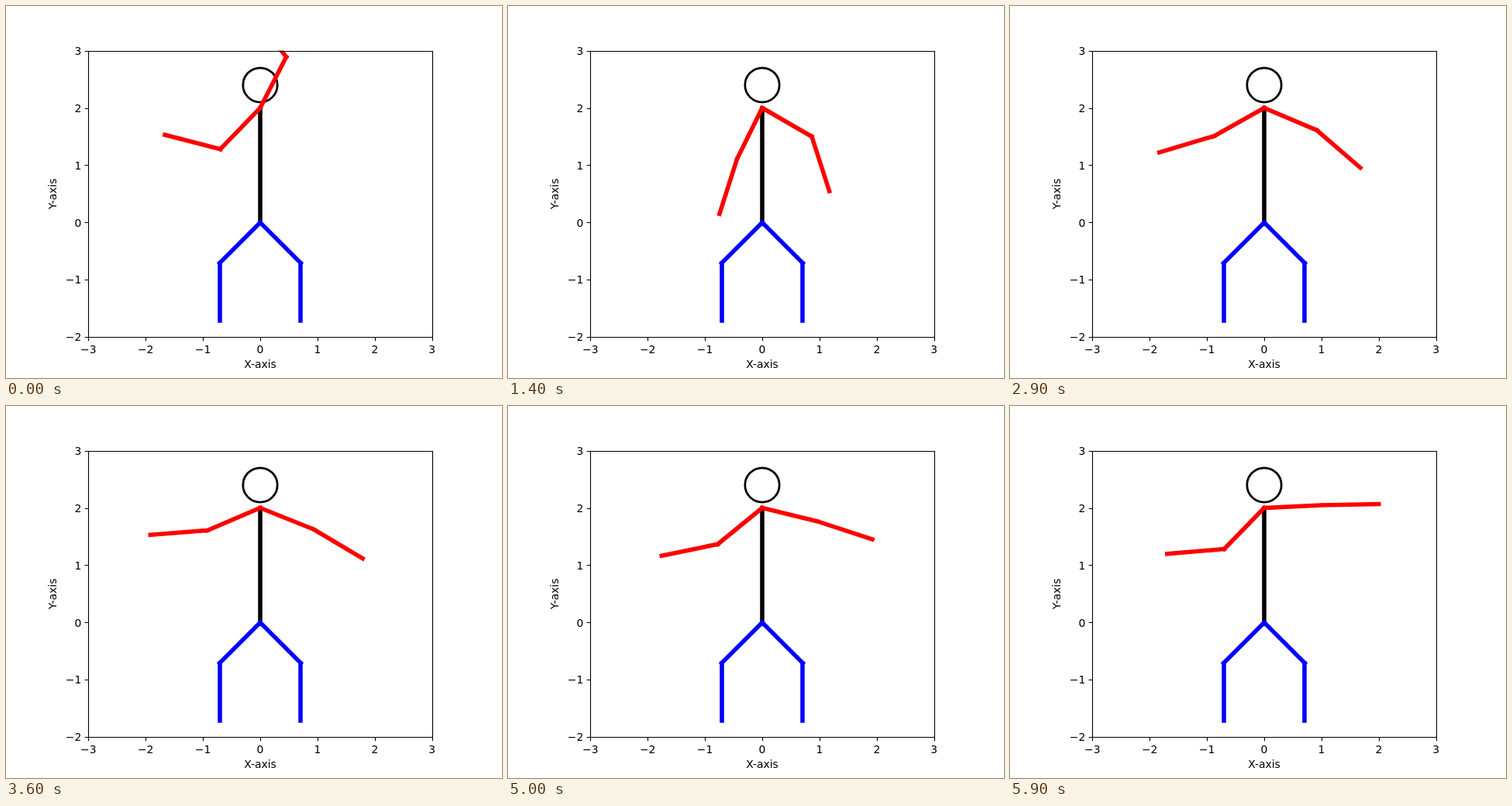
Write an HTML page that moves like this. It is 640 px wide and 480 px high and loops after 6 s.

```html
<!DOCTYPE html>
<html lang="en">
<head>
<meta charset="utf-8">
<title>Stick figure</title>
<style>
  html, body { margin: 0; width: 100%; height: 100%; overflow: hidden; background: #fff; }
  svg { display: block; width: 640px; height: 480px; }
  text { font: 13.89px "DejaVu Sans", sans-serif; }
</style>
</head>
<body>
<svg viewBox="0 0 640 480">
  <clipPath id="plot"><rect x="106.24" y="57.6" width="443.52" height="369.6"/></clipPath>
  <g clip-path="url(#plot)" fill="none" stroke-width="5.56" stroke-linecap="square">
    <circle cx="328" cy="101.95" r="22.18" stroke="#000" stroke-width="2.78"/>
    <path d="M328 132V279" stroke="#000"/>
    <path id="arms" stroke="#f00"/>
    <path id="legs" stroke="#00f"/>
  </g>
  <path id="axes" fill="none" stroke="#000" stroke-width="1.11"/>
  <g id="labels"></g>
  <text x="328" y="467" text-anchor="middle">X-axis</text>
  <text transform="translate(65.3 242.4) rotate(-90)" text-anchor="middle">Y-axis</text>
</svg>
<script>
const UNIT = 73.92, STEP = 100, LOOP = 6000, RAD = Math.PI / 180;
const el = id => document.getElementById(id);
const px = x => 328 + x * UNIT;
const py = y => 279.36 - y * UNIT;
const snap = v => Math.floor(v + 0.5) + 0.5;

// Key poses: step, then degrees of left upper arm, left forearm, right upper arm, right forearm
const poses = [
  [0, 226, 165.6, 63, 128],
  [4, 268, 228, -43, 305],
  [6, 289.7, 253.7, -61.9, 283.1],
  [14, 243.8, 252.3, -30, 287.8],
  [22, 221.7, 216.4, -24.2, 306.9],
  [36, 203.1, 184.5, -21.8, 329.3],
  [50, 219.2, 191.7, -13.7, 341.8],
  [59, 225.8, 184.9, 2.8, 361.1]
];

// Slope through the neighbouring poses, at rest at both ends
function slope(i, k) {
  const a = poses[i - 1], b = poses[i + 1];
  return a && b ? (b[k] - a[k]) / (b[0] - a[0]) : 0;
}

// Cubic Hermite blend of one angle
function angle(step, k) {
  const i = poses.findIndex(p => p[0] >= step && p[0] > 0) - 1;
  const a = poses[i], b = poses[i + 1], span = b[0] - a[0];
  const s = (step - a[0]) / span, q = 1 - s;
  return a[k] * (1 + 2 * s) * q * q + b[k] * s * s * (3 - 2 * s)
    + span * s * q * (slope(i, k) * q - slope(i + 1, k) * s);
}

const seg = (x1, y1, x2, y2) =>
  `M${px(x1).toFixed(2)} ${py(y1).toFixed(2)}L${px(x2).toFixed(2)} ${py(y2).toFixed(2)}`;

function arm(upper, fore) {
  const x = Math.cos(upper * RAD), y = 2 + Math.sin(upper * RAD);
  return seg(0, 2, x, y) + seg(x, y, x + Math.cos(fore * RAD), y + Math.sin(fore * RAD));
}

function leg(side) {
  const k = Math.SQRT1_2, x = side * k;
  return seg(0, 0, x, -k) + `M${Math.round(px(x))} ${Math.round(py(-k))}V${Math.round(py(-k - 1))}`;
}

function label(x, y, n, anchor) {
  const t = document.createElementNS("http://www.w3.org/2000/svg", "text");
  t.setAttribute("x", x);
  t.setAttribute("y", y);
  t.setAttribute("text-anchor", anchor);
  t.textContent = n < 0 ? "\u2212" + -n : n;
  el("labels").append(t);
}

function drawAxes() {
  const left = snap(px(-3)), right = snap(px(3)), top = snap(py(3)), bottom = snap(py(-2));
  let d = `M${left} ${top}H${right}V${bottom}H${left}Z`;
  for (let n = -3; n <= 3; n++) {
    d += `M${snap(px(n))} ${bottom}v4.86`;
    label(px(n), 447.5, n, "middle");
    if (n < -2) continue;
    d += `M${left} ${snap(py(n))}h-4.86`;
    label(97.3, Math.round(py(n) + 5.2), n, "end");
  }
  el("axes").setAttribute("d", d);
}

function draw(ms) {
  const step = Math.floor(ms % LOOP / STEP);
  const [lu, lf, ru, rf] = [1, 2, 3, 4].map(k => angle(step, k));
  el("arms").setAttribute("d", arm(lu, lf) + arm(ru, rf));
}

drawAxes();
el("legs").setAttribute("d", leg(-1) + leg(1));
draw(0);
const start = performance.now();
function tick() {
  draw(performance.now() - start);
  requestAnimationFrame(tick);
}
requestAnimationFrame(tick);
</script>
</body>
</html>
```
